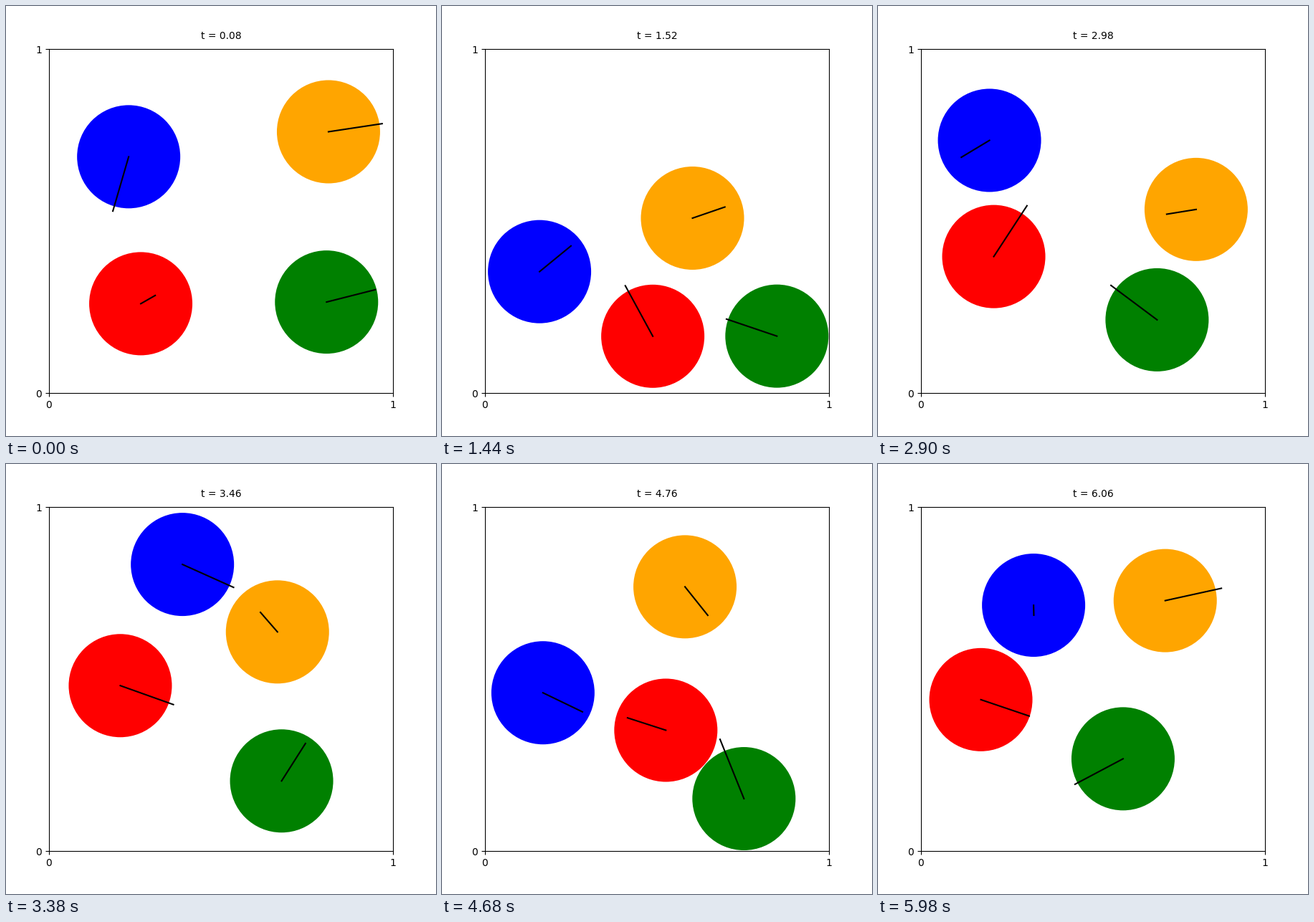
A matplotlib script that plays this animation: 600x600 px, repeating every 6 s.

```python
import numpy as np
import matplotlib.pyplot as plt
from matplotlib.animation import FuncAnimation
from itertools import combinations

SIGMA = 0.15
DT = 0.02
START = 4
FRAMES = 300
ARROW = 0.2
COLORS = ["red", "green", "blue", "orange"]
POS = [[0.25, 0.25], [0.75, 0.25], [0.25, 0.75], [0.75, 0.75]]
VEL = [[0.21, 0.12], [0.71, 0.18], [-0.23, -0.79], [0.78, 0.1177]]


def wall_time(x, v):
    if v > 0:
        return (1 - SIGMA - x) / v
    if v < 0:
        return (x - SIGMA) / -v
    return np.inf


def pair_time(dr, dv):
    b = dr @ dv
    disc = b * b - (dv @ dv) * (dr @ dr - 4 * SIGMA**2)
    if disc > 0 and b < 0:
        return -(b + np.sqrt(disc)) / (dv @ dv)
    return np.inf


def next_event(pos, vel):
    walls = [(wall_time(pos[k, d], vel[k, d]), "wall", k, d)
             for k in range(4) for d in range(2)]
    pairs = [(pair_time(pos[j] - pos[i], vel[j] - vel[i]), "pair", i, j)
             for i, j in combinations(range(4), 2)]
    return min(walls + pairs)


def collide(pos, vel, kind, a, b):
    if kind == "wall":
        vel[a, b] *= -1
        return
    e = pos[b] - pos[a]
    e /= np.linalg.norm(e)
    push = e * ((vel[b] - vel[a]) @ e)
    vel[a] += push
    vel[b] -= push


def simulate(steps):
    """Event-driven hard disks in a box, sampled every DT."""
    pos, vel = np.array(POS), np.array(VEL)
    states = [(pos.copy(), vel.copy())]
    wait, *event = next_event(pos, vel)
    for _ in range(steps):
        left = DT
        while wait <= left:
            pos += vel * wait
            left -= wait
            collide(pos, vel, *event)
            wait, *event = next_event(pos, vel)
        pos += vel * left
        wait -= left
        states.append((pos.copy(), vel.copy()))
    return states


states = simulate(START + FRAMES)

fig = plt.figure(figsize=(6, 6), dpi=100)
ax = fig.add_axes([0.1, 0.1, 0.8, 0.8])
ax.set(xlim=(0, 1), ylim=(0, 1), xticks=[0, 1], yticks=[0, 1])
disks = [ax.add_patch(plt.Circle((0, 0), SIGMA, fc=c)) for c in COLORS]
arrows = [ax.plot([], [], "k-", lw=1.5)[0] for _ in COLORS]
label = ax.text(0.5, 1.03, "", ha="center")


def update(n):
    step = START + n
    for disk, arrow, p, v in zip(disks, arrows, *states[step]):
        tip = p + ARROW * v
        disk.center = p
        arrow.set_data([p[0], tip[0]], [p[1], tip[1]])
    label.set_text(f"t = {step * DT:.2f}")
    return [*disks, *arrows, label]


anim = FuncAnimation(fig, update, frames=FRAMES, interval=20,
                     repeat=True, repeat_delay=0)
plt.show()
```
